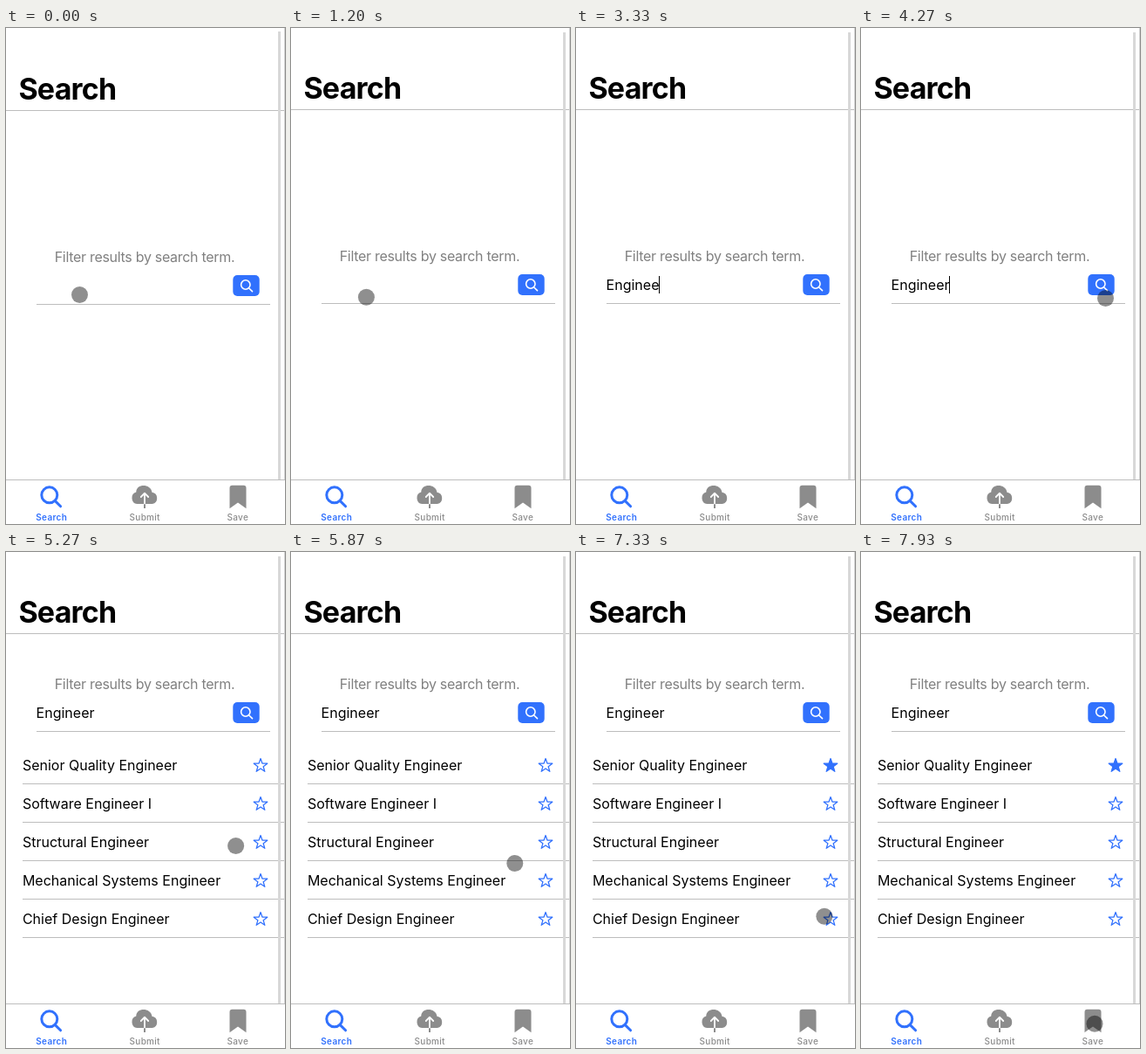
Recreate the animation shown at these times as an HTML page. Size 320 by 568 pixels, loop 8 s.

```html
<!DOCTYPE html>
<html lang="en">
<head>
<meta charset="utf-8">
<title>Search</title>
<style>
  html, body { margin: 0; width: 100%; height: 100%; overflow: hidden; background: #fff; }
  svg { display: block; width: 100%; height: 100%; font: 16px Inter, sans-serif; }
  .title { font-size: 34px; font-weight: 700; letter-spacing: -.8px; }
  .hint { fill: #808080; letter-spacing: -.3px; text-anchor: middle; }
  .label { font-size: 10px; font-weight: 500; letter-spacing: .3px; text-anchor: middle; }
  .rule { fill: #bdbdbd; }
  .blue { fill: #3171fd; }
  .gray { fill: #8c8c8c; }
  .line { fill: none; stroke-linecap: round; stroke-linejoin: round; }
  .star { fill: none; stroke: #3171fd; stroke-width: 1.25; stroke-linejoin: round; }
  .star.saved { fill: #3171fd; }
</style>
</head>
<body>
<svg viewBox="0 0 320 568">
  <g id="page">
    <text class="title" x="14.4" y="81.4">Search</text>
    <rect class="rule" y="93" width="320" height="1"/>
    <g id="form">
      <text class="hint" x="159" y="267">Filter results by search term.</text>
      <text id="term" x="34.6" y="300"></text>
      <rect id="caret" y="284" width="1" height="20"/>
      <rect class="rule" x="35" y="315" width="268" height="1"/>
      <rect class="blue" x="260.3" y="282" width="30.4" height="24" rx="5"/>
      <path class="line" stroke="#fff" stroke-width="1.6" d="M280 293a5.2 5.2 0 1 0-10.4 0a5.2 5.2 0 1 0 10.4 0M278.7 297l3.8 3.6"/>
    </g>
    <g id="results"></g>
  </g>
  <rect id="scrollbar" x="312" width="3" fill="#d8d8d8"/>
  <rect x="319" width="1" height="517" fill="#d0d0d0"/>

  <rect y="517" width="320" height="51" fill="#fff"/>
  <rect class="rule" y="517" width="320" height="1"/>
  <path class="line" stroke="#3171fd" stroke-width="3" d="M58.8 534.8a9 9 0 1 0-18 0a9 9 0 1 0 18 0M56.4 541.6l6.2 6.2"/>
  <path class="gray" d="M150.3 545a6.6 6.9 0 0 1-1-13.5C149.3 521.5 166 521.5 167.5 531.8a6.7 6.7 0 0 1 .3 13.2zM158 545h2v5h-2z"/>
  <path class="line" stroke="#fff" stroke-width="1.8" d="M154.8 537l4.2-4.3 4.2 4.3M159 533.2V544.5"/>
  <path class="gray" d="M259.5 523.7h13a3 3 0 0 1 3 3v23.5l-9.5-6.6-9.5 6.6v-23.5a3 3 0 0 1 3-3z"/>
  <text class="label blue" x="52.2" y="564" style="font-weight:600">Search</text>
  <text class="label gray" x="159.2" y="564">Submit</text>
  <text class="label gray" x="265.8" y="564">Save</text>

  <circle id="pointer" r="9.5" fill-opacity=".44"/>
</svg>
<script>
const LOOP = 8000, WORD = 'Engineer';
const SETTLE = 870, FOCUS = 1600, TYPE = 2470, KEY_GAP = 143;
const HIDE = 2530, REAPPEAR = 3870, SHOW_RESULTS = 4600, SAVE = 6530;
const jobs = ['Senior Quality Engineer', 'Software Engineer I', 'Structural Engineer',
  'Mechanical Systems Engineer', 'Chief Design Engineer'];

const rest = { x: 84.5, y: 305.5 };
const moves = [
  { from: 470, to: 730, x: 82, y: 313 },
  { from: 870, to: 1330, x: 90.5, y: 304 },
  { from: REAPPEAR, to: 4270, x: 280.5, y: 309.5 },
  { from: 4270, to: 4470, x: 277, y: 297 },
  { from: 4730, to: 5470, x: 252, y: 371 },
  { from: 5600, to: 6400, x: 293.7, y: 244 },
  { from: 6730, to: 7530, x: 278, y: 551 },
  { from: 7600, to: 7930, x: 268, y: 540.3 }
];

const $ = id => document.getElementById(id);
const set = (el, attrs) => { for (const k in attrs) el.setAttribute(k, attrs[k]); };
const show = (el, on) => set(el, { visibility: on ? 'visible' : 'hidden' });
const clamp = (v, max) => Math.max(0, Math.min(max, v));

function starPoints(cx, cy) {
  return Array.from({ length: 10 }, (_, i) => {
    const r = i % 2 ? 3.3 : 8.2, a = i * Math.PI / 5;
    return [cx + r * Math.sin(a), cy - r * Math.cos(a)].map(v => v.toFixed(2));
  }).join(' ');
}

$('results').innerHTML = jobs.map((job, i) => {
  const y = 244 + 44 * i;
  return `<text x="18.9" y="${y + 6}">${job}</text>
    <polygon class="star" points="${starPoints(292, y + .7)}"/>
    <rect class="rule" x="19" y="${y + 21}" width="301" height="1"/>`;
}).join('');
const firstStar = document.querySelector('.star');

// Each move gathers speed from wherever the previous one ended.
function pointerAt(t) {
  return moves.reduce((p, m) => {
    const k = clamp((t - m.from) / (m.to - m.from), 1) ** 2;
    return { x: p.x + (m.x - p.x) * k, y: p.y + (m.y - p.y) * k };
  }, rest);
}

function draw(t) {
  const bounce = t < SETTLE ? 1 : 0, found = t >= SHOW_RESULTS;
  set($('page'), { transform: `translate(0 ${bounce})` });
  set($('scrollbar'), { y: 5 - bounce, height: 512 + bounce });
  set($('form'), { transform: `translate(0 ${found ? -110 : 0})` });

  const term = $('term');
  term.textContent = WORD.slice(0, clamp(Math.floor((t - TYPE) / KEY_GAP) + 1, WORD.length));
  set($('caret'), { x: Math.round(34.5 + term.getComputedTextLength()) });
  show($('caret'), t >= FOCUS && !found);

  show($('results'), found);
  firstStar.classList.toggle('saved', t >= SAVE);

  const { x, y } = pointerAt(t);
  set($('pointer'), { cx: x, cy: y });
  show($('pointer'), t < HIDE || t >= REAPPEAR);
}

const start = performance.now();
function tick() {
  draw((performance.now() - start) % LOOP);
  requestAnimationFrame(tick);
}
tick();
</script>
</body>
</html>
```
